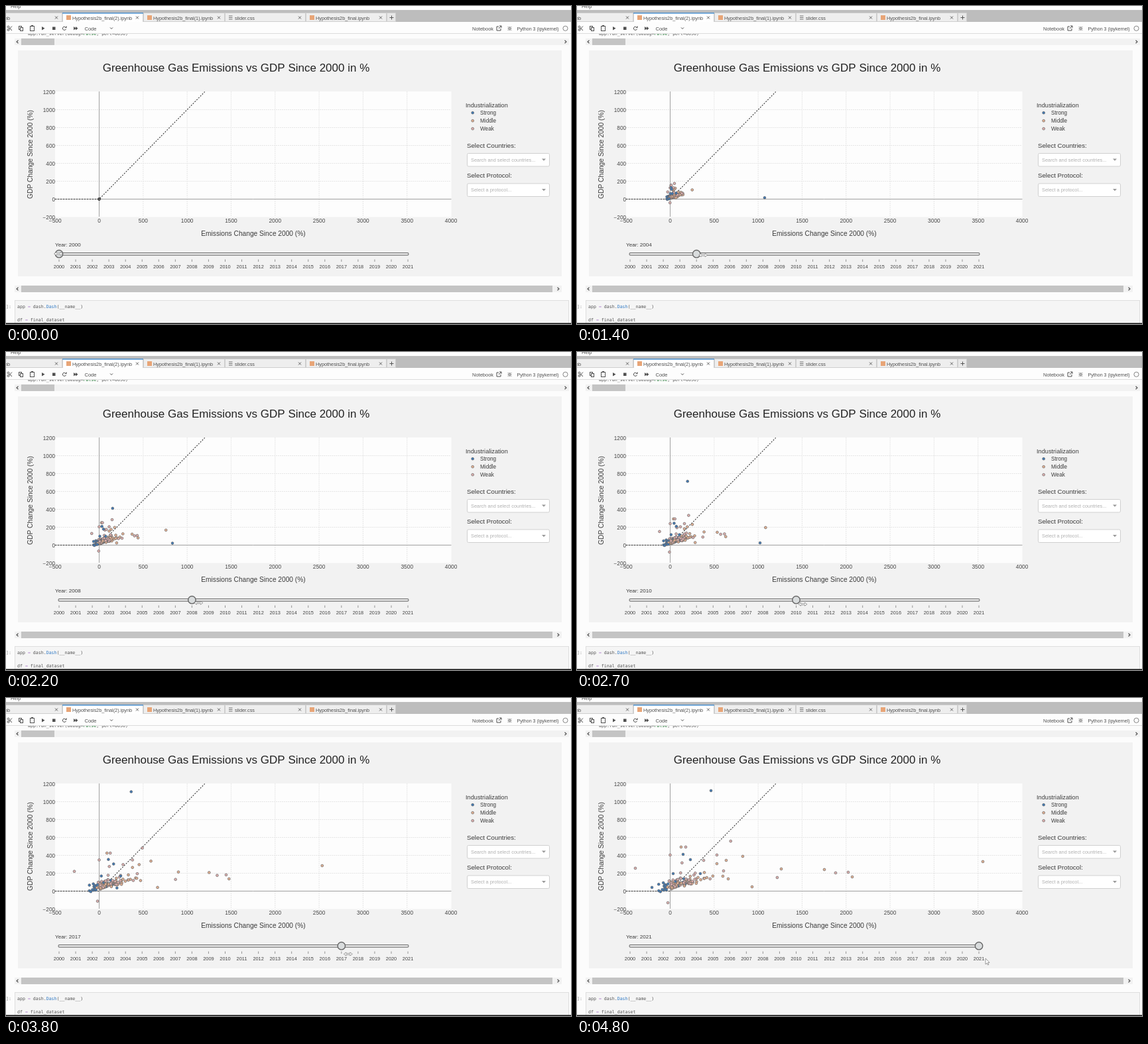
Recreate the animation shown at these times as an HTML page with a canvas. Size 852 by 480 pixels, loop 4900 ms.

```html
<!DOCTYPE html>
<html lang="en">
<head>
<meta charset="utf-8">
<title>Emissions vs GDP</title>
<style>
html, body { margin: 0; width: 100%; height: 100%; overflow: hidden; background: #fcfcfc; }
canvas { display: block; width: 852px; height: 480px; }
</style>
</head>
<body>
<canvas id="stage"></canvas>
<script>
const W = 852, H = 480, LOOP = 4900, STEP = 100;
const SANS = '"Liberation Sans", Arial, sans-serif';
const MONO = '"DejaVu Sans Mono", "Liberation Mono", monospace';
const canvas = document.getElementById('stage');
const c = canvas.getContext('2d');
const dpr = window.devicePixelRatio || 1;
canvas.width = W * dpr;
canvas.height = H * dpr;

// chart origin, and pixels per 500 % / 200 %
const X0 = 140.5, Y0 = 291.5, DX = 66.32, DY = 27;
const LAST = 21, GAP = 25.05;
const BLUE = '#4079b5', ORANGE = '#e4b193', PINK = '#dfb0af';

// ---- drawing helpers
function rect(x, y, w, h, fill, stroke) {
  if (fill) { c.fillStyle = fill; c.fillRect(x, y, w, h); }
  if (stroke) { c.strokeStyle = stroke; c.lineWidth = 1; c.strokeRect(x + .5, y + .5, w - 1, h - 1); }
}
function round(x, y, w, h, r, fill, stroke, lw = 1) {
  c.beginPath();
  c.roundRect(x, y, w, h, r);
  c.fillStyle = fill; c.fill();
  c.strokeStyle = stroke; c.lineWidth = lw; c.stroke();
}
function path(pts, color, lw = 1, fill) {
  c.beginPath();
  for (let i = 0; i < pts.length; i += 2) c.lineTo(pts[i], pts[i + 1]);
  if (fill) { c.closePath(); c.fillStyle = fill; c.fill(); }
  if (color) { c.strokeStyle = color; c.lineWidth = lw; c.stroke(); }
}
function dashed(pts, dash, color, lw) {
  c.setLineDash(dash);
  path(pts, color, lw);
  c.setLineDash([]);
}
function ring(x, y, r, fill, stroke, lw) {
  c.beginPath();
  c.arc(x, y, r, 0, Math.PI * 2);
  if (fill) { c.fillStyle = fill; c.fill(); }
  if (stroke) { c.strokeStyle = stroke; c.lineWidth = lw; c.stroke(); }
}
function text(s, x, y, size, color = '#3c3c3c', align = 'left', font = SANS) {
  c.font = size + 'px ' + font;
  c.fillStyle = color;
  c.textAlign = align;
  c.fillText(s, x, y);
}
function code(parts, x, y) {
  for (const [s, color] of parts) {
    text(s, x, y, 6.6, color, 'left', MONO);
    x += c.measureText(s).width;
  }
}
function cross(x, y) {
  path([x - 2, y - 2, x + 2, y + 2], '#666');
  path([x + 2, y - 2, x - 2, y + 2], '#666');
}

// ---- timing
function blend(keys, vals, t) {
  let i = 0;
  while (i < keys.length - 2 && t > keys[i + 1]) i++;
  const f = Math.min(1, Math.max(0, (t - keys[i]) / (keys[i + 1] - keys[i])));
  return vals[i] + (vals[i + 1] - vals[i]) * f;
}
const drag = t => blend([300, 1400, 2200, 2700, 3300, 3800, 4400], [0, 4, 8, 10, 14, 17, LAST], t);

// ---- data: each dot gives [emissions %, gdp %] for years since 2000
let seed = 77;
function rnd() {
  seed = (seed * 16807) % 2147483647;
  return seed / 2147483647;
}
const bell = () => (rnd() + rnd() + rnd() + rnd() - 2) * 1.73;
const tail = () => -Math.log(rnd());
const grow = (k, power) => Math.pow(k / LAST, power);

// most countries: a dense core with a long tail to the upper right
function crowd() {
  const e = 68 * bell() + 100 * tail() - 10;
  const g = Math.max(-15, 35 + .22 * e + 38 * tail() + 12 * bell());
  const color = e < -40 || rnd() < .07 ? BLUE : rnd() < .5 ? ORANGE : PINK;
  return { color, at: k => [e * grow(k, .75), g * grow(k, .65)] };
}
// outliers: GDP rises early, emissions late
const outlier = color => ([e, g]) => ({ color, at: k => [e * grow(k, 1.6), g * grow(k, .7)] });

const middle = [
  [3555, 330], [2070, 159], [1753, 241], [1263, 248], [931, 48], [825, 389],
  [531, 307], [660, 137], [599, 167], [124, 493], [637, 344]
];
const weak = [
  [2024, 211], [1881, 204], [1217, 152], [688, 559], [-396, 256], [-26, -130],
  [531, 404], [607, 226], [177, 493], [0, 404], [381, 344]
];
const strong = [[147, 411], [230, 352], [343, 196], [34, 196]];

const dots = [
  ...Array.from({ length: 135 }, crowd),
  ...middle.map(outlier(ORANGE)),
  ...weak.map(outlier(PINK)),
  ...strong.map(outlier(BLUE)),
  { color: BLUE, at: k => [464 * grow(k, 1.15), 1125 / (1 + Math.exp(.55 * (9 - k)))] },
  { color: BLUE, at: k => [blend([0, 4, 8, 10, 14, LAST], [0, 1074, 833, 1022, 509, -207], k), 10 + 1.5 * k] }
];
const dot = (x, y, color) => ring(x, y, 1.9, color, '#666', .7);

// ---- notebook chrome
function tab(x, w, label, active, icon) {
  rect(x, 10, w, 14, active ? '#fff' : '#eeeeee', '#cfcfcf');
  if (active) {
    rect(x, 10, w, 1.5, '#4a8fce');
    rect(x + 1, 22, w - 2, 2, '#fff');
  }
  if (icon) rect(x + 6, 14, 7, 7, '#e8a577');
  text(label, x + 15, 20.5, 7.3, '#505050');
  cross(x + w - 9, 17.5);
}

function toolbar() {
  const ink = '#505050';
  ring(3.5, 36, 1.4, null, ink, 1);
  ring(3.5, 31.5, 1.4, null, ink, 1);
  path([4.5, 32.5, 9, 37], ink);
  path([4.5, 35, 9, 30.5], ink);
  rect(19, 30, 5, 6, null, ink);
  rect(21, 32, 5, 6, '#fff', ink);
  rect(36, 30, 7, 8, '#fff', ink);
  rect(38, 29, 3, 2, ink);
  path([54, 31, 58.5, 33.8, 54, 36.6], null, 1, ink);
  rect(70, 31.5, 4.5, 4.5, ink);
  c.beginPath();
  c.arc(88, 33.8, 2.6, .3, 5.2);
  c.strokeStyle = ink; c.lineWidth = 1; c.stroke();
  path([88.5, 33, 91.5, 33, 91.5, 30], null, 1, ink);
  for (const x of [102, 105]) path([x, 31, x + 3.5, 33.8, x, 36.6], null, 1, ink);
  text('Code', 118.5, 36.5, 7.5, ink);
  path([157, 32.5, 159, 34.5, 161, 32.5], ink);
  text('Notebook', 703, 36.5, 7.5, ink);
  path([743, 31, 740, 31, 740, 37, 746, 37, 746, 34], ink);
  path([743, 34, 747, 30, 744, 30], ink);
  path([747, 30, 747, 33], ink);
  ring(759.5, 34, 2, '#bbb', '#999', 1);
  for (const y of [31.5, 34, 36.5]) path([756, y, 763, y], '#aaa', .6);
  text('Python 3 (ipykernel)', 770.5, 36.5, 7.1, ink);
  ring(843.5, 33.8, 3.6, null, '#666', .8);
}

function scrollbar(y, left, right, end) {
  rect(13, y, end - 8, 10, '#f2f2f2');
  rect(left, y, right - left, 10, '#c4c4c4');
  path([18.5, y + 2.7, 16, y + 5, 18.5, y + 7.3], '#555', 1.2);
  path([end - 1.5, y + 2.7, end + 1, y + 5, end - 1.5, y + 7.3], '#555', 1.2);
}

function chrome() {
  rect(0, 0, W, H, '#fcfcfc');
  code([['app.run_server(debug=', '#555'], ['False', '#287a3a'], [', port=8050)', '#555']], 33, 44.3);
  rect(0, 0, W, 42, '#fdfdfd');
  text('Help', 7, 2.8, 7.5, '#555');
  rect(0, 6, W, 18, '#bdbdbd');
  tab(-37, 122, '', false);
  text('.ipynb', 6, 20.5, 7.3, '#505050', 'right');
  tab(85, 122, 'Hypothesis2b_final(2).ipynb', true, true);
  tab(207, 123, 'Hypothesis2b_final(1).ipynb', false, true);
  tab(330, 122, 'slider.css', false);
  for (const y of [15, 17.5, 20]) path([336, y, 341.5, y], '#777');
  tab(452, 122, 'Hypothesis2b_final.ipynb', false, true);
  rect(574, 10, 14, 14, '#e8e8e8', '#cfcfcf');
  path([578.5, 17.5, 584.5, 17.5], '#555');
  path([581.5, 14.5, 581.5, 20.5], '#555');
  toolbar();
  rect(0, 41, W, 1, '#dcdcdc');
  scrollbar(49, 23, 73, 844);
  scrollbar(422, 23, 824, 833);
  rect(13, 444, 836, 40, '#f5f5f5', '#dedede');
  text(']:', 0, 456, 6.6, '#888', 'left', MONO);
  code([['app ', '#555'], ['=', '#b58ad0'], [' dash.', '#555'], ['Dash', '#2f78c4'], ['(__name__)', '#555']], 17, 456);
  code([['df ', '#555'], ['=', '#b58ad0'], [' final_dataset', '#555']], 17, 476);
  rect(0, 478.5, W, 1.5, '#111');
}

// ---- dashboard
function select(y, title, hint) {
  text(title, 695, y - 8.5, 9.7);
  round(695.5, y + .5, 124, 19.5, 2, '#fff', '#d0d0d0');
  text(hint, 701, y + 12.5, 7.4, '#b0b0b0');
  path([808, y + 8.5, 814, y + 8.5, 811, y + 11.7], null, 1, '#999');
}

function axes() {
  const label = v => String(v).replace('-', '\u2212');
  for (let i = -1; i <= 8; i++) {
    const x = X0 + i * DX;
    if (i > 0 && i < 8) dashed([x, 129, x, 318], [2, 1], '#e6e6e6');
    text(label(i * 500), x, 327, 8.4, '#484848', 'center');
  }
  for (let i = -1; i <= 6; i++) {
    const y = Y0 - i * DY;
    if (i > 0 && i < 6) dashed([74, y, 671, y], [2, 1], '#e6e6e6');
    text(label(i * 200), 74, y + 3, 8.2, '#484848', 'right');
  }
  path([X0, 129, X0, 318], '#a0a0a0');
  path([74, Y0, 671.5, Y0], '#a0a0a0');
  text('Emissions Change Since 2000 (%)', 373, 347.3, 10.2, '#3c3c3c', 'center');
  c.save();
  c.translate(39.5, 224);
  c.rotate(-Math.PI / 2);
  text('GDP Change Since 2000 (%)', 0, 0, 10.25, '#3c3c3c', 'center');
  c.restore();
  dashed([74, Y0, X0, Y0, X0 + 2.4 * DX, 129.5], [2, 2], '#333', 1.1);
}

function plot(k) {
  rect(18, 67, 820, 341, '#f2f2f2');
  text('Greenhouse Gas Emissions vs GDP Since 2000 in %', 347, 98.5, 17, '#222', 'center');
  rect(74, 129, 597.5, 189.5, '#fdfdfd');
  axes();
  if (k === 0) ring(X0, Y0, 1.7, '#aaa', '#111', 1.2);
  else for (const d of dots) {
    const [e, g] = d.at(k);
    dot(X0 + e / 500 * DX, Y0 - g / 200 * DY, d.color);
  }
  text('Industrialization', 693, 152.5, 9.2);
  [['Strong', BLUE], ['Middle', ORANGE], ['Weak', PINK]].forEach(([name, color], i) => {
    dot(703.7, 161.2 + i * 12, color);
    text(name, 715, 164.4 + i * 12, 8.2);
  });
  select(222, 'Select Countries:', 'Search and select countries...');
  select(267.5, 'Select Protocol:', 'Select a protocol...');
}

function slider(k) {
  text('Year: ' + (2000 + k), 74, 363, 8.1);
  round(79, 372.7, 528, 3.4, 1.7, '#f4f4f4', '#777', 1.2);
  for (let i = 0; i <= LAST; i++) {
    const x = 80 + i * GAP;
    path([x, 382.5, x, 386], '#888', .9);
    text(2000 + i, x, 396, 7.4, '#444', 'center');
  }
  ring(80 + k * GAP, 374.2, 5.7, '#d9dcdd', '#666', 1.4);
}

function pointer(t, k) {
  const x = 79 + drag(t) * GAP + 11 * Math.min(1, t / 1000);
  const y = 374 + 19 * Math.pow(t / 4800, 1.8);
  const arrow = [0, 0, 0, 9, 2, 7.2, 3.5, 10, 4.8, 9.4, 3.4, 6.6, 6, 6.4];
  const resize = [-6.5, 0, -3, -2.5, -3, -1, 3, -1, 3, -2.5, 6.5, 0, 3, 2.5, 3, 1, -3, 1, -3, 2.5];
  const shape = k === LAST ? arrow : resize;
  path(shape.map((v, i) => v + (i % 2 ? y : x)), '#808080', .8, '#fff');
}

function draw(now) {
  const t = Math.floor((now % LOOP) / STEP) * STEP;
  const k = Math.floor(drag(t) + 1e-6);
  c.setTransform(dpr, 0, 0, dpr, 0, 0);
  chrome();
  plot(k);
  slider(k);
  pointer(t, k);
}

let start = null;
function tick(now) {
  if (start === null) start = now;
  draw(now - start);
  requestAnimationFrame(tick);
}
draw(0);
requestAnimationFrame(tick);
</script>
</body>
</html>
```
